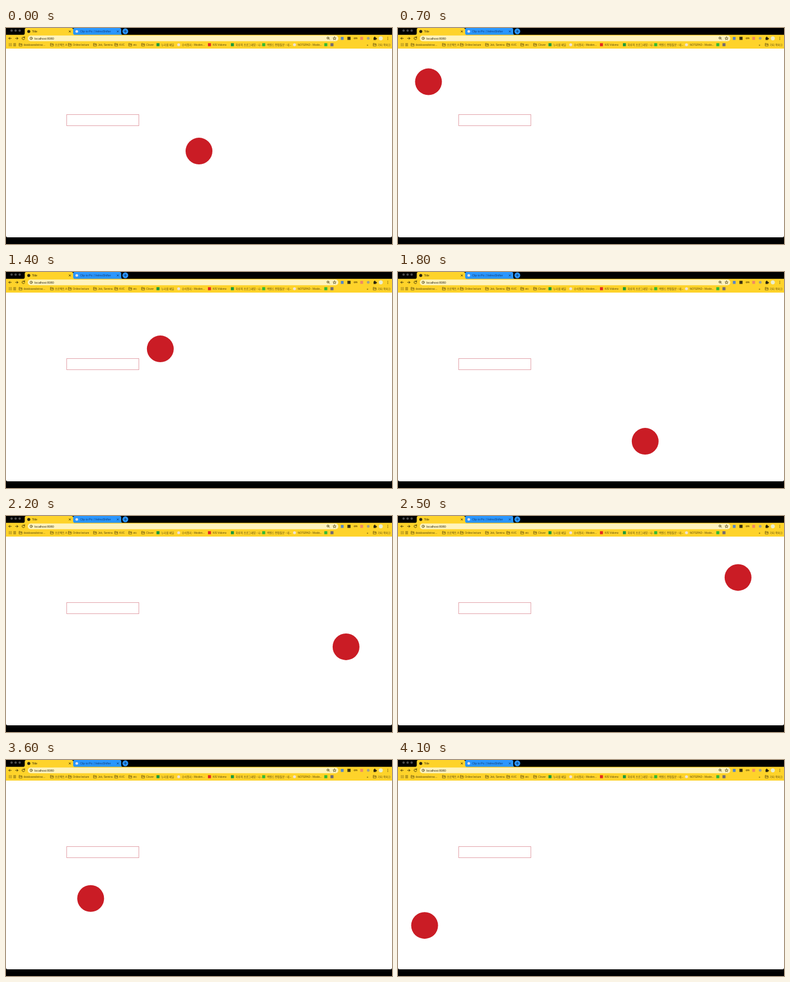
Recreate the animation shown at these times as an HTML page. Size 690 by 388 pixels, loop 4.2 s.

```html
<!DOCTYPE html>
<html lang="ko">
<meta charset="utf-8">
<title>Title</title>
<style>
  html, body { margin: 0; width: 690px; height: 388px; overflow: hidden; background: #000; }
  svg { display: block; }
  text { font: 4.7px "Liberation Sans", "Noto Sans CJK KR", sans-serif; fill: #5c4c12; }
  .line { fill: none; stroke: #3d3308; stroke-width: .9; stroke-linecap: round; }
</style>
<svg width="690" height="388" viewBox="0 0 690 388">
  <rect width="690" height="388"/>
  <path fill="#fff" d="M0 36H690V373Q690 376 687 376H3Q0 376 0 373Z"/>
  <rect x="108.5" y="155.5" width="129" height="20" fill="none" stroke="#e3a3aa"/>
  <circle id="ball" r="24" fill="#ca1c25"/>

  <!-- tabs -->
  <g fill="#4b4b4b"><circle cx="10" cy="4.7" r="2.1"/><circle cx="17.2" cy="4.7" r="2.1"/><circle cx="24.4" cy="4.7" r="2.1"/></g>
  <path fill="#2a96ff" d="M118 12.5Q120 12 120 9V3Q120 0 123 0H203Q206 0 206 3V9Q206 12 208 12.5Z"/>
  <path fill="#fed32a" d="M0 12.3H31Q33.5 12 33.5 9V3Q33.5 0 36.5 0H117Q120 0 120 3V9Q120 12 122.500 12.300H690V37H0Z"/>
  <circle cx="40.700" cy="6.200" r="2.700" fill="#2b260e"/>
  <text x="46.500" y="7.900" style="font-size:5px;fill:#332a05">Title</text>
  <path class="line" d="M112.700 4.800l2.800 2.800m0-2.800l-2.800 2.800"/>
  <circle cx="126.500" cy="6.200" r="2.400" fill="#e8e2e4"/>
  <text x="132.500" y="7.900" style="font-size:5px;fill:#123c70">Clip to Pic | VelmoShifter</text>
  <path class="line" style="stroke:#123c70" d="M198.500 4.900l2.600 2.600m0-2.600l-2.600 2.600"/>
  <circle cx="213.300" cy="6" r="5.200" fill="#2a96ff"/>
  <path class="line" style="stroke:#0b3160" d="M211 6h4.600M213.300 3.700v4.600"/>

  <!-- toolbar -->
  <rect x="39" y="13.500" width="555" height="10.300" rx="5.100" fill="#fff3bd"/>
  <path class="line" d="M9.500 18.600H5m2-2l-2 2l2 2M17 18.600h4.500m-2-2l2 2l-2 2M33 17a2.400 2.400 0 1 0 .5 2M33.300 15.500v1.800h-1.800"/>
  <g class="line" style="stroke-width:.7"><circle cx="45" cy="18.600" r="2.300"/><path d="M45 18.300v1.500M45 17.200v.1"/>
    <circle cx="575.500" cy="18" r="1.900"/><path d="M577 19.500l1.600 1.600M574.700 18h1.600"/>
    <path d="M587.300 15.900l.8 1.900l2 .1l-1.500 1.300l.5 2l-1.800-1.100l-1.800 1.100l.5-2l-1.500-1.300l2-.1z"/></g>
  <text x="51" y="20.500" style="font-size:5.400px;fill:#302a14">localhost:8080</text>
  <rect x="598.500" y="16" width="5" height="5.400" fill="#5a87c4"/>
  <rect x="610.300" y="15.800" width="5.600" height="5.600" fill="#3b3212"/>
  <text x="621.500" y="20.300" style="font-weight:bold;fill:#574000">cm</text>
  <rect x="633.300" y="15.900" width="5" height="5.400" fill="#ef8a63"/>
  <circle cx="647.500" cy="18.600" r="2.500" fill="#a1a18a"/>
  <path fill="#2d270d" d="M657 17h1.200a1.100 1.100 0 1 1 2 0h1.200v1.300a1.100 1.100 0 1 1 0 1.800v1.300h-4.400z"/>
  <circle cx="670" cy="18.600" r="3.600" fill="#e9edce"/>
  <g fill="#3d3308"><circle cx="682.500" cy="16.500" r=".6"/><circle cx="682.500" cy="18.600" r=".6"/><circle cx="682.500" cy="20.700" r=".6"/></g>

  <!-- bookmarks bar -->
  <path stroke="#75621b" stroke-width="1.200" stroke-dasharray="1.200 .8" d="M5 28h5.200M5 30h5.200M5 32h5.200"/>
  <path class="line" style="stroke-width:.7" d="M13.500 28h4M13.500 30h4M13.500 32h4"/>
  <text x="645" y="31.600" style="font-weight:bold">»</text>
  <g id="bookmarks"></g>
</svg>
<script>
const folder = "#6b5712", green = "#1d9a3c", pale = "#eee3d8";
// icon x, icon colour, label
const bookmarks = [
  [23, folder, "databaseabstrac..."], [79, folder, "프로젝트 A"], [111, folder, "Online lecture"],
  [156, folder, "Job, Semina"], [194, folder, "KVC"], [219, folder, "etc"], [242, folder, "Clover"],
  [269, green, "누리샘 메일"], [306, pale, "수식정리 - Moolen..."], [361, "#e42a20", "KIS Vidomo"],
  [402, green, "하루의 프로그래밍 - 나..."], [458, "#35b934", "백엔드 면접질문 - 네..."],
  [513, pale, "NOTEPAD - Moole..."], [569, "#35b934", ""], [580, "#756c70", ""], [656, folder, "기타 북마크"]
];

function bookmark([x, color, label]) {
  const icon = color === folder
    ? `<path fill="none" stroke="${color}" stroke-width=".8" d="M${x + .4} 32.300v-4.700h2l.8 1h2.500v3.700zm0-2.700h5.300"/>`
    : color === pale
      ? `<circle cx="${x + 2.7}" cy="30" r="2.600" fill="${color}"/>`
      : `<rect x="${x}" y="27.300" width="5.400" height="5.400" fill="${color}"/>`;
  return icon + `<text x="${x + 8.5}" y="31.700">${label}</text>`;
}
document.getElementById("bookmarks").innerHTML = bookmarks.map(bookmark).join("");

// The ball moves diagonally on a grid and bounces off the walls and the box.
const CELL = 6.917, COLS = 94, ROWS = 43, BOX_TOP = 12, BOX_BOTTOM = 20, BOX_RIGHT = 33;
const STEPS_PER_TICK = 6, LAST_STEP = 239, TICK = 100, LOOP = 4200;

function ballAt(steps) {
  let x = 47, y = 24, dx = -1, dy = -1;
  for (let i = 0; i < steps; i++) {
    x += dx;
    y += dy;
    if (x === 0 || x === COLS) dx = -dx;
    const hitsBox = x < BOX_RIGHT && y === (dy > 0 ? BOX_TOP : BOX_BOTTOM);
    if (y === 0 || y === ROWS || hitsBox) dy = -dy;
  }
  return [19.9 + x * CELL, 55.1 + y * CELL];
}

const ball = document.getElementById("ball");
function draw() {
  const tick = Math.floor(performance.now() % LOOP / TICK);
  const [x, y] = ballAt(Math.min(tick * STEPS_PER_TICK, LAST_STEP));
  ball.setAttribute("cx", x);
  ball.setAttribute("cy", y);
  requestAnimationFrame(draw);
}
draw();
</script>
</html>
```
